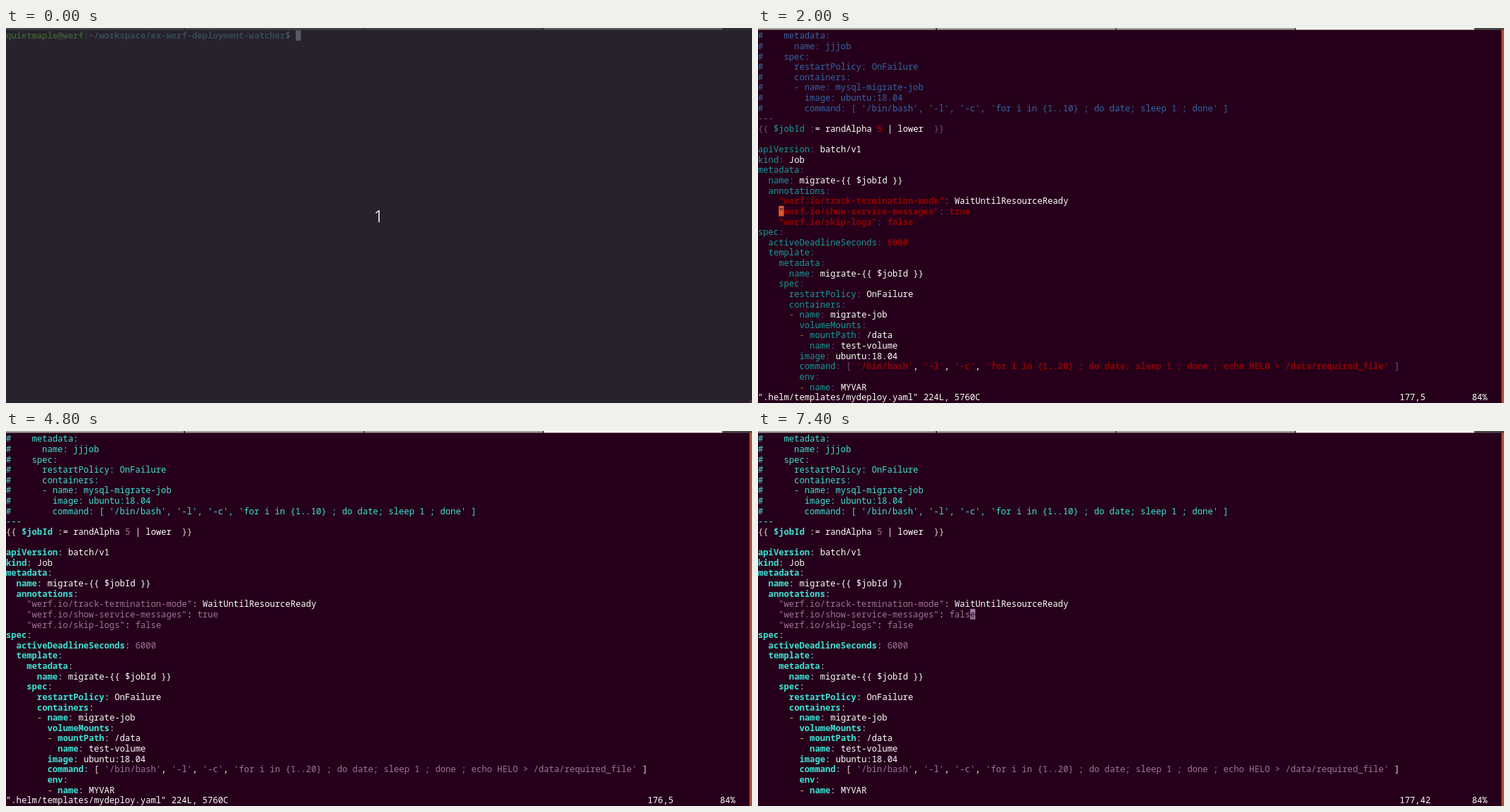
Write an HTML page that moves like this. It is 1054x531 px and loops after 8000 ms.

```html
<!DOCTYPE html>
<html lang="en">
<head>
<meta charset="utf-8">
<title>Terminal session</title>
<style>
  html, body { margin: 0; width: 100%; height: 100%; overflow: hidden; background: #26001b; }
  svg { display: block; width: 1054px; height: 531px; }
  text { font: 12.183px "Noto Sans Mono", "DejaVu Sans Mono", monospace; white-space: pre; }
  .bold { font-weight: bold; }
  .count { font: 23.5px "Open Sans", sans-serif; text-anchor: middle; }
</style>
</head>
<body>
<svg id="stage" viewBox="0 0 1054 531"></svg>
<script>
const LOOP = 8000, COL = 7.31, ROW = 14.625, TOP = 3.3;
const BG = '#26001b', WHITE = '#ffffff', ORANGE = '#b5533c';
const stage = document.getElementById('stage');

const USER = 'quietmaple@werf', DIR = '~/workspace/ex-werf-deployment-watcher';
const COMMAND = 'vim .helm/templates/mydeploy.yaml', INPUT_COL = 56;
const FILE_INFO = '".helm/templates/mydeploy.yaml" 224L, 5760C';
const EDIT_ROW = 17;

const FILE = `#    metadata:
#      name: jjjob
#    spec:
#      restartPolicy: OnFailure
#      containers:
#      - name: mysql-migrate-job
#        image: ubuntu:18.04
#        command: [ '/bin/bash', '-l', '-c', 'for i in {1..10} ; do date; sleep 1 ; done' ]
---
{{ $jobId := randAlpha 5 | lower  }}

apiVersion: batch/v1
kind: Job
metadata:
  name: migrate-{{ $jobId }}
  annotations:
    "werf.io/track-termination-mode": WaitUntilResourceReady
    "werf.io/show-service-messages": VALUE
    "werf.io/skip-logs": false
spec:
  activeDeadlineSeconds: 6000
  template:
    metadata:
      name: migrate-{{ $jobId }}
    spec:
      restartPolicy: OnFailure
      containers:
      - name: migrate-job
        volumeMounts:
        - mountPath: /data
          name: test-volume
        image: ubuntu:18.04
        command: [ '/bin/bash', '-l', '-c', 'for i in {1..20} ; do date; sleep 1 ; done ; echo HELO > /data/required_file' ]
        env:
        - name: MYVAR`.split('\n');

const TOKEN = new RegExp([
  '(?<comment>^#.*)',
  '(?<mark>^---)',
  '(?<key>(?<=^ *(?:- )?)\\w+(?=:)|\\$jobId(?= :))',
  '(?<str>"[^"]*"|\'[^\']*\'|(?<= )(?:true|false|6000|5)(?= |$))',
  '(?<dash>(?<=^ *)-(?= ))',
  '(?<punct>(?<=[\\w"]):(?= |$)|:(?==)|[\\[\\]]|^\\{\\{|(?<=  )\\}\\})',
  '(?<text>\\S+)'
].join('|'), 'g');

const THEMES = {
  early: { comment: '#3465a4', mark: '#75507b', key: '#169a98', str: '#8f0000', dash: '#a0701c',
           punct: '#75507b', text: WHITE, bold: 'str', cursor: '#dd5a30' },
  late: { comment: '#3fe0d2', mark: '#3fe0d2', key: '#3fe0d2', str: '#a07399', dash: '#d8c650',
          punct: '#f0d6d2', text: WHITE, bold: 'key', cursor: '#a67ba1' }
};

// Each step overrides the state of the one before it.
const STEPS = [
  [0, { mode: 'shell', typed: '', row: 0, col: 56, on: true, dim: true }],
  [400, { dim: false, on: false }],
  [500, { on: true }],
  [600, { typed: 'v', col: 57 }],
  [800, { typed: 'vim', col: 59 }],
  [1000, { typed: COMMAND, col: 60 }],
  [2000, { mode: 'early', row: EDIT_ROW, col: 4, value: 'true', info: FILE_INFO, pos: '177,5' }],
  [2500, { mode: 'late' }],
  [2600, { on: false }],
  [3200, { on: true }],
  [3800, { on: false }],
  [4200, { on: true }],
  [4500, { row: 16, pos: '176,5' }],
  [4800, { on: false }],
  [5000, { on: true, row: EDIT_ROW, pos: '177,5' }],
  [5500, { on: false }],
  [5600, { on: true }],
  [6000, { col: 41, info: '-- INSERT --', pos: '177,42' }],
  [6200, { on: false }],
  [6400, { on: true, value: 'tr', col: 39, pos: '177,40' }],
  [6500, { value: '', col: 37, pos: '177,38' }],
  [6600, { value: 'f', col: 38, pos: '177,39' }],
  [6800, { value: 'fals', col: 41, pos: '177,42' }],
  [7000, { value: 'false', col: 42, pos: '177,43' }],
  [7400, { col: 41, info: '', pos: '177,42' }]
];
const states = STEPS.map(() => null);
STEPS.forEach(([, change], i) => { states[i] = { ...states[i - 1], ...change }; });

function add(name, attrs, content = '') {
  const node = document.createElementNS('http://www.w3.org/2000/svg', name);
  for (const key in attrs) node.setAttribute(key, attrs[key]);
  node.textContent = content;
  stage.appendChild(node);
}

function rect(x, y, width, height, fill, opacity = 1) {
  add('rect', { x, y, width, height, fill, opacity });
}

function put(row, col, string, fill = WHITE, bold = false) {
  const y = TOP + row * ROW + 12;
  add('text', { x: col * COL, y, fill, class: bold ? 'bold' : '' }, string);
}

function cursor(row, col, char, fill) {
  rect(col * COL, TOP + row * ROW, COL, ROW, fill);
  if (char.trim()) put(row, col, char, BG);
}

function drawTabs() {
  rect(0, 0, 1054, 2.5, '#3b3733');
  for (const x of [0, 253, 506.5]) rect(x, 0, x ? 252 : 251, 2.5, '#a5a298');
  rect(760, 0, 252, 2.5, '#f5f3f2');
  rect(1012, 0, 42, 2.5, '#4b4844');
}

function drawShell(s) {
  put(0, 0, USER, '#8ae234', true);
  put(0, 15, ':');
  put(0, 16, DIR, '#729fcf', true);
  put(0, 54, '$');
  put(0, INPUT_COL, s.typed);
  if (s.on) cursor(0, s.col, s.typed[s.col - INPUT_COL] || '', WHITE);
  rect(1051, 527, 3, 4, ORANGE);
}

function drawEditor(s) {
  const theme = THEMES[s.mode];
  const lines = FILE.map(line => line.replace('VALUE', s.value));
  lines.forEach((line, row) => {
    for (const match of line.matchAll(TOKEN)) {
      const kind = Object.keys(match.groups).find(name => match.groups[name]);
      put(row, match.index, match[0], theme[kind], kind === theme.bold);
    }
  });
  put(35, 0, s.info, WHITE, s.info.startsWith('--'));
  put(35, 124, s.pos);
  put(35, 138, '84%');
  if (s.on) {
    const char = lines[s.row][s.col] || '';
    cursor(s.row, s.col, char, char ? theme.cursor : WHITE);
  }
  rect(1050.5, 2.5, 3.5, 528.5, ORANGE);
}

function draw(s) {
  stage.replaceChildren();
  rect(0, 0, 1054, 531, BG);
  drawTabs();
  if (s.mode === 'shell') drawShell(s);
  else drawEditor(s);
  if (s.dim) {
    rect(0, 0, 1054, 531, '#272d32', 0.77);
    add('text', { x: 526.5, y: 274.5, fill: '#dcdad5', class: 'count' }, '1');
  }
}

let shown = -1;
function tick() {
  const t = performance.now() % LOOP;
  const index = STEPS.findLastIndex(([start]) => start <= t);
  if (index !== shown) draw(states[shown = index]);
  requestAnimationFrame(tick);
}
tick();
</script>
</body>
</html>
```
